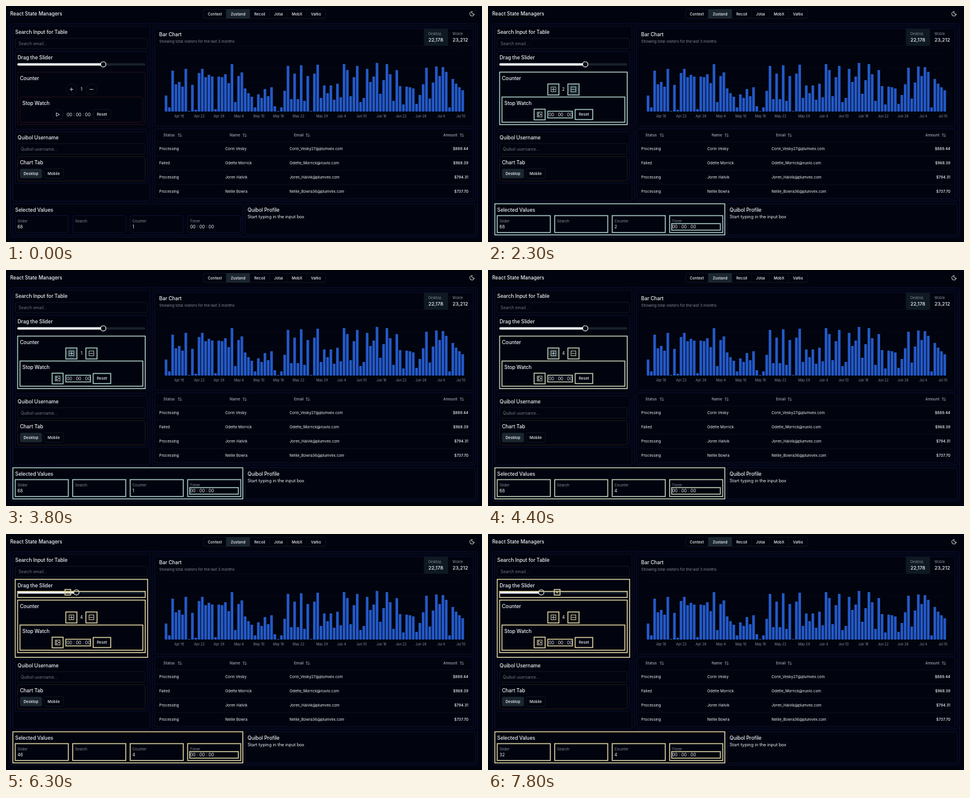
An HTML page for the animation above (8000 ms loop, 800 px wide and 398 px high).

```html
<!DOCTYPE html>
<html lang="en">
<head>
<meta charset="utf-8">
<title>State managers</title>
<style>
html, body { margin: 0; width: 100%; height: 100%; overflow: hidden; background: #01040e; }
svg { display: block; width: 800px; height: 398px; }
text { font-family: Inter, "Liberation Sans", sans-serif; white-space: pre; }
</style>
</head>
<body>
<svg id="stage" viewBox="0 0 800 398" fill="none"></svg>
<script>
const WHITE = '#f0f3f7', GREY = '#858d9a', NAVY = '#11143f', LINE = '#141c29', HOVER = '#1b262f';
const PLAIN = 6.3, BODY = 7.3, HEAD = 8.33;
const stage = document.getElementById('stage');

// Boxes are given by their left, top, right and bottom edges.
const box = (l, t, r, b, stroke = NAVY, fill = 'none', rx = 3, w = 0.8, extra = '') =>
  `<rect x="${l}" y="${t}" width="${r - l}" height="${b - t}" rx="${rx}" fill="${fill}" stroke="${stroke}" stroke-width="${w}" ${extra}/>`;
const text = (x, y, s, size = PLAIN, fill = WHITE, weight = 400, extra = '') =>
  `<text x="${x}" y="${y}" font-size="${size}" font-weight="${weight}" fill="${fill}" ${extra}>${s}</text>`;
const path = (d, stroke = WHITE, w = 0.8, extra = '') =>
  `<path d="${d}" stroke="${stroke}" stroke-width="${w}" stroke-linecap="round" stroke-linejoin="round" ${extra}/>`;
const circle = (x, y, r, stroke, fill = 'none', extra = '') =>
  `<circle cx="${x}" cy="${y}" r="${r}" stroke="${stroke}" stroke-width="0.8" fill="${fill}" ${extra}/>`;
const sortIcon = (x, y) =>
  path(`M${x - 1.6} ${y + 2.6}V${y - 2.6}l-1.5 1.5m1.5 -1.5l1.5 1.5M${x + 1.8} ${y - 2.6}v5.2l-1.5 -1.5m1.5 1.5l1.5 -1.5`, '#a4abb6', 0.65);
const MIDDLE = 'text-anchor="middle"', END = 'text-anchor="end"';

function header() {
  const edges = [332, 370, 410, 443, 473, 505, 537];
  const tabs = ['Context', 'Zustand', 'Recoil', 'Jotai', 'MobX', 'Valtio'];
  return text(7, 16, 'React State Managers', HEAD, WHITE, 500) +
    box(332, 5.5, 537, 21, LINE) + box(370, 5.5, 410, 21, 'none', HOVER, 0) +
    tabs.map((s, i) => text((edges[i] + edges[i + 1]) / 2, 15.6, s, PLAIN, WHITE, 500, MIDDLE)).join('') +
    edges.slice(1, -1).map(x => path(`M${x} 5.5V21`, LINE, 0.6)).join('') +
    path('M783.2 9.6a2.7 2.7 0 0 0 3.7 3.7a3.7 3.7 0 1 1 -3.7 -3.7z', WHITE, 0.9);
}

function controls() {
  return box(7.5, 30, 792.5, 389.5) + box(11.5, 34, 242, 329) +
    text(15.5, 47, 'Search Input for Table', HEAD, WHITE, 500) +
    box(15.5, 54.5, 238, 72, LINE) + text(21, 65.8, 'Search email...', 6.9, '#737b88') +
    box(15.5, 76.5, 238, 208) + text(19.5, 89.5, 'Drag the Slider', HEAD, WHITE, 500) +
    box(19, 96.4, 234, 100.4, 'none', '#18222d', 2) +
    box(19, 96.4, 164, 100.4, 'none', WHITE, 2, 0, 'id="range"') +
    circle(164, 98.4, 4.4, WHITE, '#01040e', 'id="thumb" style="stroke-width:1.2"') +
    box(19.5, 111.5, 234, 200, '#2b1526') + text(23.5, 124.5, 'Counter', HEAD, WHITE, 500) +
    circle(110, 140.6, 9.2, LINE, 'none', 'id="plus"') + circle(143.6, 140.6, 9.2, LINE, 'none', 'id="minus"') +
    path('M107.3 140.6h5.4m-2.7 -2.7v5.4M140.9 140.6h5.4') +
    text(126.8, 143.2, '', BODY, WHITE, 400, MIDDLE + ' id="count"') +
    box(23.5, 153.5, 230, 196, '#33151d') + text(27.5, 166.5, 'Stop Watch', HEAD, WHITE, 500) +
    circle(87, 183, 9.2, LINE) + path('M84.8 180.3l4.9 2.7l-4.9 2.7z') +
    text(102, 185.7, '00 : 00 : 00', BODY) +
    box(146.5, 174.5, 176, 191.5, LINE) + text(161.3, 185.3, 'Reset', PLAIN, WHITE, 500, MIDDLE) +
    box(15.5, 212, 238, 299) + text(19.5, 225, 'Quibol Username', HEAD, WHITE, 500) +
    box(19.5, 232, 234, 250, LINE) + text(25, 243.5, 'Quibol username...', 6.9, '#737b88') +
    box(19.5, 254, 234, 295, '#2a1f1c') + text(23.5, 267, 'Chart Tab', HEAD, WHITE, 500) +
    box(23.5, 274.5, 60.5, 290.5, 'none', HOVER) + text(42, 284.8, 'Desktop', PLAIN, WHITE, 500, MIDDLE) +
    box(64, 274.5, 96.5, 290.5, LINE) + text(80.2, 284.8, 'Mobile', PLAIN, WHITE, 500, MIDDLE);
}

function chart() {
  const bars = [27, 7, 69, 46, 50, 42, 72, 1, 45, 3, 65, 72, 58, 62, 59, 4, 59, 58, 63, 48, 80, 16, 60, 66,
    39, 31, 25, 7, 29, 23, 38, 26, 41, 9, 1, 7, 35, 77, 21, 64, 21, 78, 18, 60, 1, 64, 79, 23, 44, 31, 44,
    20, 47, 24, 80, 70, 26, 58, 77, 16, 23, 72, 50, 59, 82, 30, 53, 80, 63, 18, 70, 43, 12, 42, 41, 39,
    13, 28, 46, 74, 22, 49, 76, 60, 75, 67, 7, 55, 47, 41, 36];
  const days = { 291: 'Apr 16', 325: 'Apr 22', 358: 'Apr 28', 391.5: 'May 4', 425: 'May 10', 458: 'May 16',
    491.5: 'May 22', 531: 'May 29', 564: 'Jun 4', 597.5: 'Jun 10', 631: 'Jun 16', 664: 'Jun 22',
    697.5: 'Jun 28', 731.5: 'Jul 4', 764.5: 'Jul 10' };
  return box(246, 34, 789, 329) + box(250, 38, 785, 203) +
    text(257.5, 51, 'Bar Chart', HEAD, WHITE, 500) +
    text(257.5, 62, 'Showing total visitors for the last 3 months', PLAIN, GREY) +
    box(702.5, 38.4, 743, 67, 'none', '#0f1922', 0) + path('M250 67H785M702.5 38V67M743 38V67', '#0c1220', 0.6) +
    text(710, 49.3, 'Desktop', 5.5, GREY) + text(710, 60, '22,178', 8.2, WHITE, 500) +
    text(750.5, 49.3, 'Mobile', 5.5, GREY) + text(750.5, 60, '23,212', 8.2, WHITE, 500) +
    path('M266 80.5H768M266 105H768M266 129.5H768M266 154H768', '#080d18', 0.5) +
    bars.map((h, i) => box(266.8 + i * 5.54, 178 - h, 271.2 + i * 5.54, 178, 'none', '#2459c8', 0.4)).join('') +
    Object.entries(days).map(([x, s]) => text(x, 188, s, 5.6, GREY, 400, MIDDLE)).join('');
}

function table() {
  const rows = [
    ['Processing', 'Corin Vesky', 'Corin_Vesky27@plumvex.com', '$889.44'],
    ['Failed', 'Odette Morrick', 'Odette_Morrick@nuvlo.com', '$968.39'],
    ['Processing', 'Joren Halvik', 'Joren_Halvik@plumvex.com', '$794.31'],
    ['Processing', 'Nellie Bowra', 'Nellie_Bowra36@plumvex.com', '$737.70']];
  const heads = [['Status', 264.5, 292], ['Name', 376, 401], ['Email', 484, 507], ['Amount', 735, 766]];
  return box(250, 207, 785, 325) +
    heads.map(([s, x, icon]) => text(x, 220, s, PLAIN, '#a4abb6', 500) + sortIcon(icon, 217.8)).join('') +
    rows.map(([status, name, mail, sum], i) => {
      const y = 243 + i * 24;
      return path(`M253 ${y - 14}H782`, '#101623', 0.7) + text(257.5, y, status) + text(368.5, y, name) +
        text(476.5, y, mail) + text(777, y, sum, PLAIN, WHITE, 500, END);
    }).join('');
}

function footer() {
  const cards = ['Slider', 'Search', 'Counter', 'Timer'];
  return box(11.5, 333.5, 398, 386) + text(15.5, 346.5, 'Selected Values', HEAD, WHITE, 500) +
    cards.map((s, i) => box(15.5 + i * 96.6, 353.5, 104.7 + i * 96.6, 382) +
      text(19.3 + i * 96.6, 364.5, s, PLAIN, GREY)).join('') +
    text(19.3, 375, '', BODY, WHITE, 400, 'id="value"') + text(212.5, 375, '', BODY, WHITE, 400, 'id="total"') +
    text(309.5, 375, '00 : 00 : 00', BODY) +
    box(402, 333.5, 789, 386) + text(406, 346.5, 'Quibol Profile', HEAD, WHITE, 500) +
    text(406, 358, 'Start typing in the input box', BODY);
}

// Outlines of the parts that render again.
const outline = (l, t, r, b) => box(l, t, r, b, 'inherit', 'none', 0, 1.6);
const SHARED = [[19.5, 111.5, 234, 200], [23.5, 153.5, 230, 196], [100.5, 131.5, 119.2, 150], [134.3, 131.5, 153, 150],
  [77.5, 174, 96, 192], [100.5, 177.5, 142, 188.7], [146.5, 174.5, 176, 191.5], [11.5, 333.5, 398, 386],
  [308.7, 367, 390.5, 378]];
for (let i = 0; i < 4; i++) SHARED.push([15.5 + i * 96.6, 353.5, 104.7 + i * 96.6, 382]);
const ICONS = [[106, 136.6, 114, 144.6], [139.6, 136.6, 147.6, 144.6], [82.8, 179, 90.8, 187]];
const outlines = '<g id="marks">' + SHARED.map(b => outline(...b)).join('') +
  ICONS.map(b => box(...b, 'inherit', 'none', 0, 1)).join('') +
  '<g id="drag">' + outline(15.5, 76.5, 238, 208) + outline(19.5, 96.8, 234, 107) +
  '<g id="ghost">' + outline(-4.8, 93.6, 4.8, 103) + box(-1, 97.4, 1, 99.4, 'inherit', 'none', 0, 1) + '</g></g></g>';

stage.innerHTML = '<rect width="800" height="398" fill="#01040e"/>' +
  header() + controls() + chart() + table() + footer() + outlines;
const el = {};
stage.querySelectorAll('[id]').forEach(e => el[e.id] = e);

// Each step changes some of the state: count, hovered button, outline opacity and heat.
const STEPS = [
  [0, { count: 1, hover: '', show: 0, heat: 0 }], [900, { hover: 'plus' }],
  [1200, { count: 2, show: 1 }], [1400, { show: 0.3 }], [1500, { show: 0 }],
  [1700, { count: 3, show: 1 }], [2000, { show: 0.3 }], [2100, { show: 0, hover: '' }], [2200, { hover: 'minus' }],
  [2300, { count: 2, show: 1 }], [2600, { show: 0.3 }], [2700, { show: 0 }],
  [2900, { count: 1, show: 1 }], [3200, { show: 0.3 }],
  [3300, { count: 0, show: 1 }], [3500, { show: 0.3 }], [3600, { show: 0, hover: 'plus' }],
  [3700, { count: 1, show: 1 }], [3900, { count: 2, heat: 0.15 }], [4100, { count: 3, heat: 0.3 }],
  [4400, { count: 4, heat: 0.45 }], [4700, { show: 0.3 }], [4800, { show: 0 }], [4900, { hover: '' }],
  [5500, { show: 1, heat: 0 }], [5600, { heat: 0.2 }], [5700, { heat: 0.4 }], [5800, { heat: 0.6 }],
  [5900, { heat: 0.8 }], [6000, { heat: 1 }]];
const SLIDES = [[0, 68], [5500, 62], [5600, 52], [5700, 41], [5800, 32], [5900, 27], [6000, 39], [6200, 39], [6300, 46],
  [6400, 54], [6500, 61], [6600, 67], [6700, 71], [6800, 69], [6900, 64], [7000, 58], [7100, 53], [7200, 49],
  [7300, 47], [7600, 45], [7800, 32]];

const COOL = [165, 198, 193], WARM = [216, 205, 156];
const thumbX = v => 19 + v * 2.15 + 4.75 * (1 - v / 50);

function draw(t) {
  const s = Object.assign({}, ...STEPS.filter(([at]) => at <= t).map(([, change]) => change));
  const past = SLIDES.filter(([at]) => at <= t);
  const value = past[past.length - 1][1];
  const before = past[Math.max(0, past.length - 2)][1];
  el.count.textContent = el.total.textContent = s.count;
  el.value.textContent = value;
  for (const id of ['plus', 'minus']) el[id].setAttribute('fill', s.hover === id ? HOVER : 'none');
  el.thumb.setAttribute('cx', thumbX(value));
  el.range.setAttribute('width', thumbX(value) - 19);
  el.marks.setAttribute('opacity', s.show);
  el.marks.setAttribute('stroke', `rgb(${COOL.map((c, i) => Math.round(c + (WARM[i] - c) * s.heat))})`);
  el.drag.setAttribute('display', t >= 5500 ? 'inline' : 'none');
  el.ghost.setAttribute('transform', `translate(${thumbX(before)} 0)`);
}

const start = performance.now();
function tick() {
  draw((performance.now() - start) % 8000);
  requestAnimationFrame(tick);
}
tick();
</script>
</body>
</html>
```
